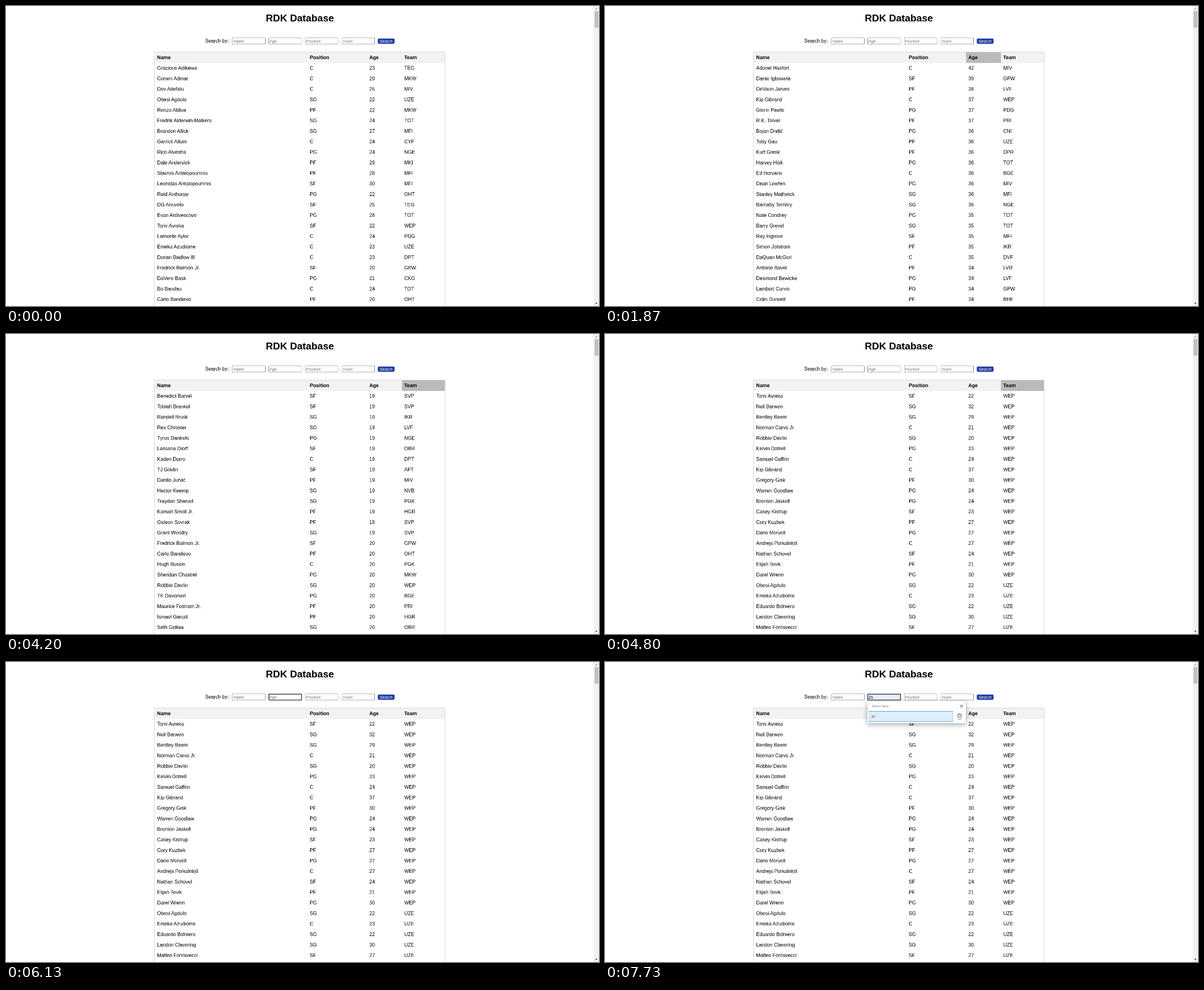
Recreate the animation shown at these times as an HTML page. Size 1053 px wide and 532 px high, loop 8000 ms.

```html
<!DOCTYPE html>
<html lang="en">
<head>
<meta charset="utf-8">
<title>Player database</title>
<style>
html, body { margin: 0; width: 100%; height: 100%; overflow: hidden; background: #fff; }
/* A full-size page shown scaled down; will-change keeps the text drawn at full size */
#page {
  position: absolute; width: 1920px; height: 970px; overflow: hidden; background: #fff;
  transform: scale(calc(1053 / 1920)); transform-origin: 0 0; will-change: transform;
  font: 16px/18px "Liberation Sans", Arial, sans-serif; color: #000; white-space: pre;
}
#page > *, #popup > * { position: absolute; box-sizing: border-box; }
h1 { left: 0; top: 21px; width: 1903px; margin: 0; font-size: 32px; line-height: 37px; text-align: center; }
#label { left: 645px; top: 104px; }
.field {
  top: 103px; width: 108px; height: 21px; padding-left: 2px;
  border: 1px solid #767676; border-radius: 2px;
  font-size: 13.333px; line-height: 19px; color: #757575;
}
.field.hover { border-color: #333; }
.field.focus { border-color: #101010; outline: 2px solid #101010; outline-offset: -2px; }
.field.preview { background: #e8f0fe; color: #000; }
#caret { left: 853px; top: 106px; width: 1px; height: 15px; background: #000; }
#button {
  left: 1204px; top: 105px; width: 54px; height: 17px; border-radius: 4px;
  background: #1f3da1; color: #fff; font-size: 13.333px; line-height: 17px; text-align: center;
}
#table { left: 480px; top: 148px; width: 943px; height: 900px; border: 2px solid #ddd; }
.row { display: grid; grid-template-columns: 494px 193px 113px 139px; height: 34px; }
.row > * { padding: 8px 0 8px 7.5px; }
#head { background: #f2f2f2; font-weight: bold; }
#head .hover { background: #bbb9b9; }
#popup {
  left: 849px; top: 125px; width: 320px; height: 73px; border-radius: 3px; background: #fff;
  box-shadow: 0 5px 16px rgba(0, 0, 0, .33), 0 0 2px rgba(0, 0, 0, .4);
  font-family: "Open Sans", "Noto Sans", sans-serif;
}
#saved { left: 15px; top: 8px; font-size: 10.5px; color: #666; }
#item { left: 4px; top: 34px; width: 274px; height: 34px; padding-left: 8px; border: 1px solid transparent; font-size: 11.5px; line-height: 34px; }
#item.hover { background: #dfeefb; border-color: #5a9fd4; }
#popup svg { left: 0; top: 0; fill: none; stroke: #444; stroke-width: 1.3; }
#bar { left: 1903px; top: 0; }
</style>
</head>
<body>
<div id="page">
  <h1>RDK Database</h1>
  <div id="label">Search by:</div>
  <div id="button">Search</div>
  <div id="table"><div id="head" class="row"></div><div id="body"></div></div>
  <div id="popup">
    <div id="saved">Saved data</div>
    <div id="item">25</div>
    <svg width="320" height="73">
      <path d="M301 13l9 9m0-9l-9 9"/>
      <path id="trash" stroke="#666" d="M291 45h16M296 45v-1a3 3 0 0 1 6 0v1M293 45l1.3 13q.2 2 2 2h5.400q1.800 0 2-2l1.300-13M297.500 49.500v6M300.500 49.500v6"/>
    </svg>
  </div>
  <div id="caret"></div>
  <svg id="bar" width="17" height="970">
    <path fill="#f1f1f1" d="M0 0h17v970H0z"/>
    <path fill="#c1c1c1" d="M2 17h13v53H2z"/>
    <path fill="#a3a3a3" d="M4.500 10.500h8l-4-4.500z"/>
    <path fill="#505050" d="M4.500 959.500h8l-4 4.500z"/>
  </svg>
</div>
<script>
// Players in order of surname: name, position, age, team
const players = `Gracious Adikewa,C,23,TEG
Corwin Admar,C,29,MKW
Dov Adefalu,C,25,MIV
Obesi Agdulo,SG,22,UZE
Renzo Aldiva,PF,22,MKW
Fredrik Alderwin-Malkers,SG,24,TOT
Brandon Allick,SG,27,MFI
Garrick Allum,C,24,CYF
Rico Alvestra,PG,24,NGE
Dale Andervick,PF,29,MKI
Stavros Antalopoumnis,PF,28,MFI
Leonidas Antalopoumnis,SF,30,MFI
Reid Anthorpe,PG,22,OHT
DG Anuvelo,SF,25,TEG
Evan Ardivescovo,PG,28,TOT
Tomi Avreka,SF,22,WEP
Lamonte Aylor,C,24,PDG
Emeka Azudiome,C,23,UZE
Dorian Badlow III,C,23,DPT
Fredrick Balmon Jr.,SF,20,GPW
DaVero Bask,PG,21,CKG
Bo Bandau,C,24,TOT
Carlo Bandieso,PF,20,OHT
Benedict Barvel,SF,19,SVP
Neil Barwen,SG,32,WEP
Antoine Bavel,PF,34,LVR
Bentley Beem,SG,29,WEP
Desmond Bewicke,PG,34,LVF
Eduardo Bolniero,SG,22,UZE
Tobiah Brankel,SF,19,SVP
Randell Brusk,SG,19,IKR
Hugh Buskin,C,20,PGK
Norman Carvo Jr.,C,21,WEP
Sheridan Chastrel,PG,20,MKW
Rex Chroster,SG,19,LVF
Landon Clavering,SG,30,UZE
Nate Condrey,PG,35,TOT
Lambert Curvis,PG,34,GPW
Tyrus Dantrels,PG,19,NGE
Robbie Davlin,SG,20,WEP
TK Davorsen,PG,20,BGE
Lassana Diorf,SF,19,OBR
Kelvin Dotrell,PG,23,WEP
Bojan Drelić,PG,36,CNI
Colin Durwell,PF,34,BHE
Kaden Durro,C,19,DPT
Matteo Fontavecci,SF,27,UZE
Maurice Fostram Jr.,PF,20,PRI
Samuel Gaffrin,C,24,WEP
Ismael Garudi,PF,20,HGR
Toby Gau,PF,36,UZE
Kip Gibrand,C,37,WEP
Seth Gidlaw,SG,20,OBR
Gregory Gisk,PF,30,WEP
Warren Goodlaw,PG,24,WEP
Barry Grevel,SG,35,TOT
Kurt Gresk,PF,36,DPR
TJ Grivlin,SF,19,AFT
Adonel Hasfort,C,42,MIV
Harvey Hisk,PG,36,TOT
Ed Horvane,C,36,BGE
Dante Igbowela,SF,39,GPW
Ray Ingrove,SF,35,MFI
Brenton Jaskell,PG,24,WEP
DeVaun Jarves,PF,38,LVF
Simon Jolstrom,PF,35,IKR
Danilo Jurvić,PF,19,MIV
Hector Keemp,SG,19,NVB
Casey Kistrup,SF,23,WEP
Cory Kuzbek,PF,27,WEP
Dean Lowfen,PG,36,MIV
Stanley Mathwick,SG,36,MFI
DaQuan McGorl,C,35,DVF
Dario Morvell,PG,27,WEP
Glenn Pawle,PG,37,PDG
Andrejs Porkalniņš,C,27,WEP
Nathan Schovel,SF,24,WEP
Traydon Sharvel,SG,19,PGK
Kamari Smoll Jr.,PF,19,HGR
Gideon Sovrak,PF,19,SVP
Barnaby Tembry,SG,36,NGE
Elijah Tovik,PF,21,WEP
R.K. Tolver,PF,37,PRI
Grant Wendry,SG,19,SVP
Darel Wrenn,PG,30,WEP`.split("\n").map(line => line.split(","));

const AGE = 2, TEAM = 3;
const $ = id => document.getElementById(id);
const cells = row => row.map(text => `<div>${text}</div>`).join("");

$("head").innerHTML = cells(["Name", "Position", "Age", "Team"]);
const heads = [...$("head").children];

const fieldNames = ["Name", "Age", "Position", "Team"];
const fields = fieldNames.map((name, i) => {
  const field = document.createElement("div");
  field.className = "field";
  field.textContent = name;
  field.style.left = 732 + i * 118 + "px";
  $("page").insertBefore(field, $("popup"));
  return field;
});
const [, ageField, positionField] = fields;

const compare = (a, b) => (a > b) - (a < b);
const sorted = (column, sign) =>
  [...players].sort((a, b) => sign * compare(a[column], b[column]));
const orders = [players, sorted(AGE, -1), sorted(AGE, 1), sorted(TEAM, -1)];

let shown = -1;
function showOrder(index) {
  if (index === shown) return;
  shown = index;
  $("body").innerHTML = orders[index].slice(0, 23)
    .map(row => `<div class="row">${cells(row)}</div>`).join("");
}

function draw(t) {
  const within = (from, to = 8000) => t >= from && t < to;
  const show = (id, on) => $(id).style.visibility = on ? "visible" : "hidden";

  showOrder([1870, 3730, 4800].filter(time => t >= time).length);
  heads[AGE].classList.toggle("hover", within(1270, 4200) || within(5400, 5470));
  heads[TEAM].classList.toggle("hover", within(4200, 5400));

  const preview = within(7730);
  positionField.classList.toggle("hover", within(5730, 5800));
  ageField.classList.toggle("hover", within(5870, 6130));
  ageField.classList.toggle("focus", within(6130));
  ageField.classList.toggle("preview", preview);
  ageField.textContent = preview ? "25" : "Age";

  show("caret", within(6130, 6670) || within(7200, 7730));
  $("popup").style.display = within(6200) ? "block" : "none";
  $("item").classList.toggle("hover", within(7670));
  show("trash", within(7670));
}

const start = performance.now();
function tick() {
  draw((performance.now() - start) % 8000);
  requestAnimationFrame(tick);
}
tick();
</script>
</body>
</html>
```
